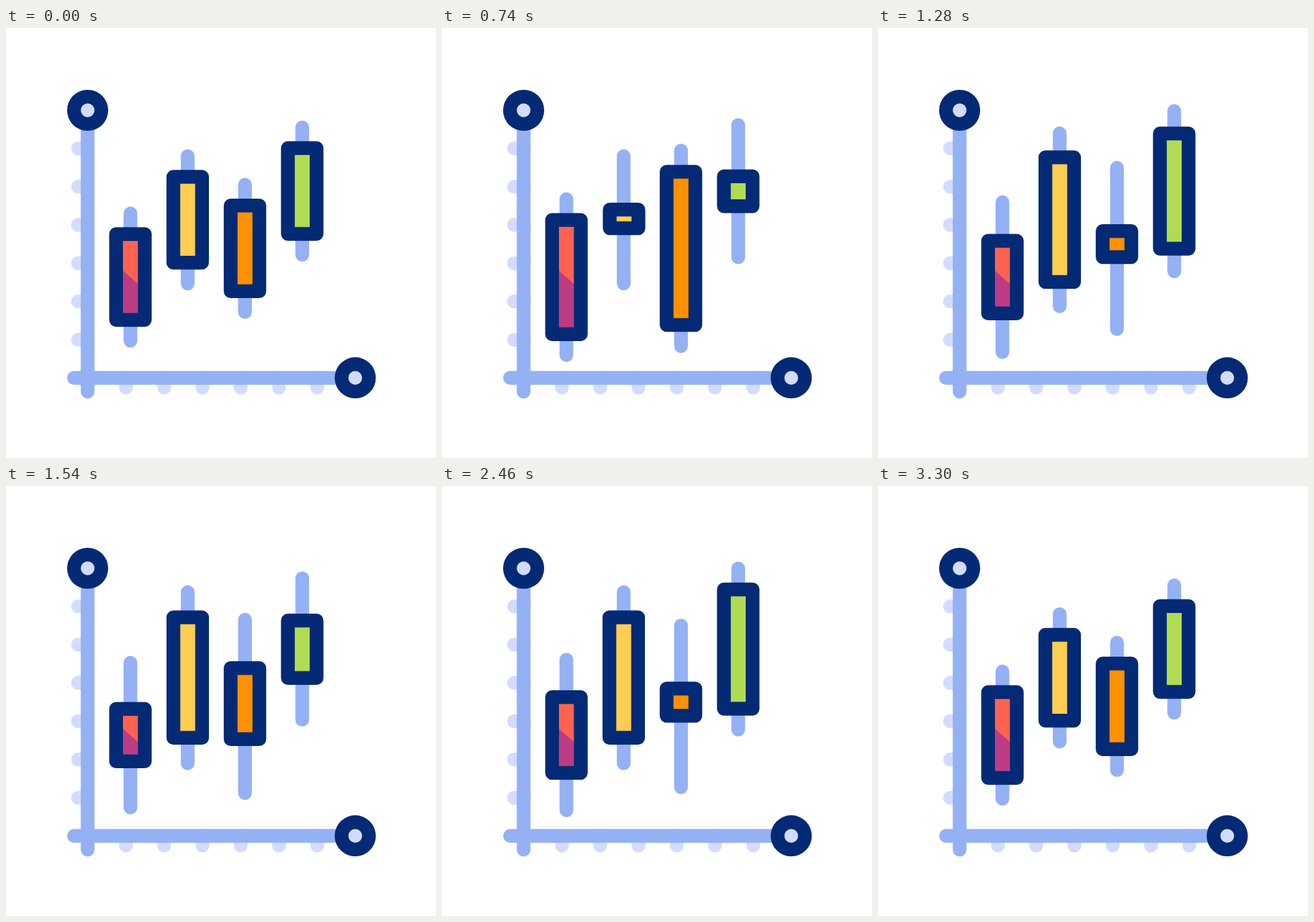
These frames come from a looping animation (640 by 640 pixels, 3420 ms). An HTML page with a canvas:

```html
<!DOCTYPE html>
<html lang="en">
<head>
<meta charset="utf-8">
<title>Candlestick chart</title>
<style>
  html, body { margin: 0; width: 100%; height: 100%; overflow: hidden; background: #fff; }
  canvas { display: block; width: 640px; height: 640px; }
</style>
</head>
<body>
<canvas id="stage" width="640" height="640"></canvas>
<script>
const ctx = document.getElementById('stage').getContext('2d');
const LOOP = 3420, STEP = 20, PHASE = 600, LINE = 20.5;
const NAVY = '#042a75', BLUE = '#94b1f4', PALE = '#d3dcfe', PURPLE = '#bc3c84';

// A pose is the outer body height, the wick height and a small body offset.
const pose = (body, wick, dx = 0, dy = 0) => ({ body, wick, dx, dy });
const REST = pose(148.2, 210);

const candles = [
  { x: 185.2, y: 370.7, delay: 300, color: '#ff6250', split: true,
    first: pose(199.5, 261.6), second: pose(97.2, 235.7) },
  { x: 270.4, y: 285.4, delay: 200, color: '#ffcd52',
    first: pose(45.5, 210, 0.6, -1.3), second: pose(224.4, 285.6) },
  { x: 355.7, y: 328, delay: 100, color: '#ff9102',
    first: pose(251, 312), second: pose(58.5, 260.3, 0, -6.4) },
  { x: 440.9, y: 242.7, delay: 0, color: '#b1db52',
    first: pose(43.5, 210, 0, 0.4), second: pose(199.5, 261.6) }
];

function poseAt(candle, time) {
  const { first, second } = candle;
  const keys = [REST, first, second, first, second, REST];
  const p = Math.min(Math.max((time - candle.delay) / PHASE, 0), 4.99999);
  const i = Math.floor(p), u = p - i, e = u * u * (3 - 2 * u);
  const mix = k => keys[i][k] + (keys[i + 1][k] - keys[i][k]) * e;
  return pose(mix('body'), mix('wick'), mix('dx'), mix('dy'));
}

function line(x1, y1, x2, y2, color) {
  ctx.strokeStyle = color;
  ctx.beginPath();
  ctx.moveTo(x1, y1);
  ctx.lineTo(x2, y2);
  ctx.stroke();
}

function disc(x, y, r, color) {
  ctx.fillStyle = color;
  ctx.beginPath();
  ctx.arc(x, y, r, 0, Math.PI * 2);
  ctx.fill();
}

function drawAxes() {
  const x0 = 121.5, y0 = 520.7;
  for (let i = 0; i < 6; i++) {
    const d = i * 56.95;
    line(107.2, 179.2 + d, x0, 179.2 + d, PALE);
    line(178.5 + d, 535.2, 178.5 + d, y0, PALE);
  }
  line(x0, 122.5, x0, 541.2, BLUE);
  line(101.3, y0, 519.8, y0, BLUE);
  for (const [x, y] of [[x0, 122.5], [519.8, y0]]) {
    disc(x, y, 30.6, NAVY);
    disc(x, y, 10.2, PALE);
  }
}

function drawCandle(candle, time) {
  const { body, wick, dx, dy } = poseAt(candle, time);
  const { x, y } = candle;
  const reach = (wick - LINE) / 2;
  line(x, y - reach, x, y + reach, BLUE);

  const w = 42.7, h = body - LINE;
  const left = x + dx - w / 2, top = y + dy - h / 2;
  ctx.fillStyle = candle.color;
  ctx.fillRect(left, top, w, h);
  if (candle.split) {
    ctx.fillStyle = PURPLE;
    ctx.beginPath();
    ctx.moveTo(174, 361.3);
    ctx.lineTo(196.4, 381);
    ctx.lineTo(196.4, top + h);
    ctx.lineTo(174, top + h);
    ctx.fill();
  }
  ctx.strokeStyle = NAVY;
  ctx.strokeRect(left, top, w, h);
}

function draw(time) {
  ctx.fillStyle = '#fff';
  ctx.fillRect(0, 0, 640, 640);
  ctx.lineWidth = LINE;
  ctx.lineCap = ctx.lineJoin = 'round';
  drawAxes();
  for (const candle of candles) drawCandle(candle, time);
}

const start = performance.now();
function tick() {
  const t = (performance.now() - start) % LOOP;
  draw(Math.floor(t / STEP) * STEP);
  requestAnimationFrame(tick);
}
tick();
</script>
</body>
</html>
```
